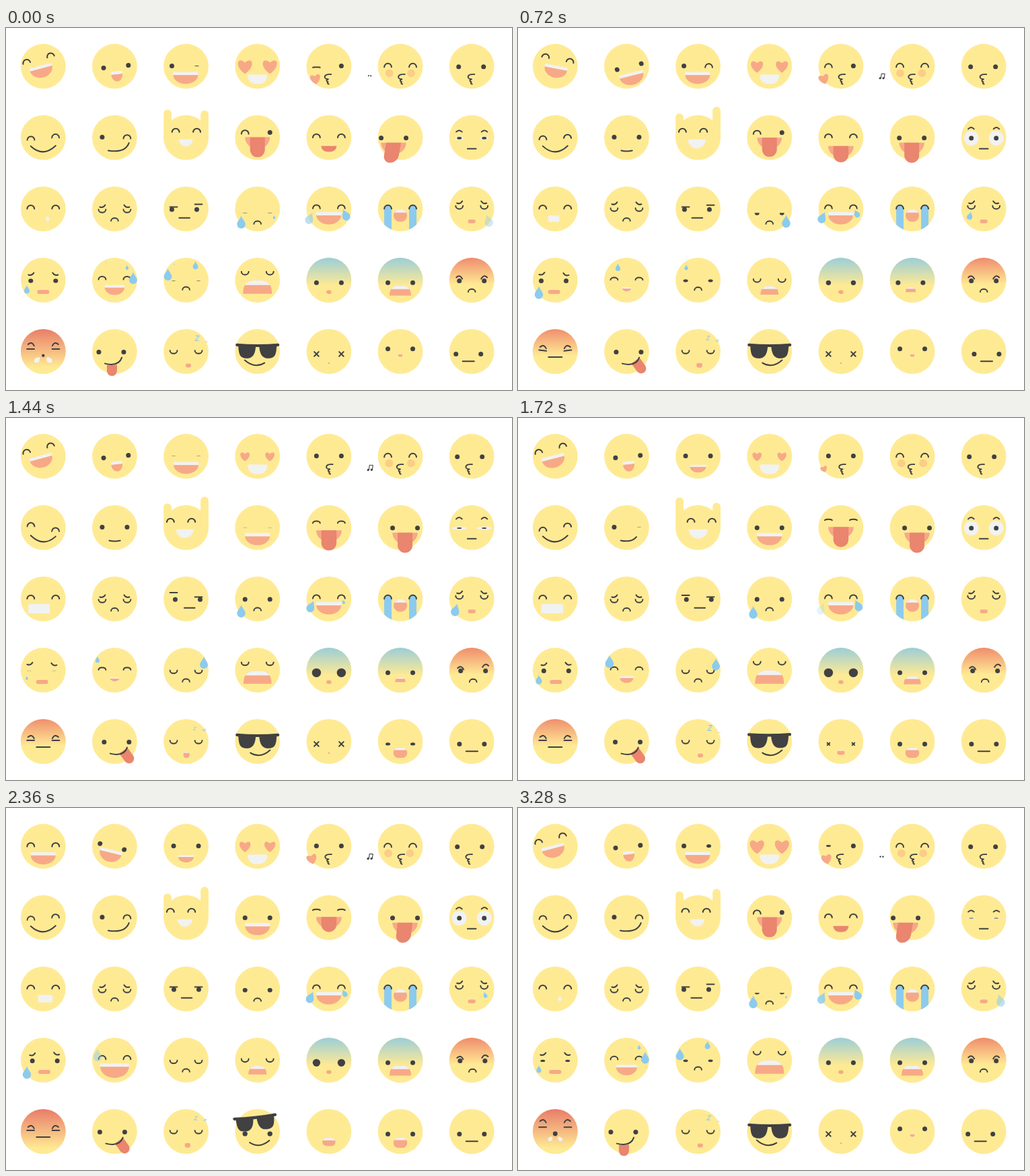
Recreate the animation shown at these times as an HTML page with a canvas. Size 752x539 px, loop 3320 ms.

```html
<!DOCTYPE html>
<html lang="en">
<head>
<meta charset="utf-8">
<title>Faces</title>
<style>
html, body { margin: 0; width: 752px; height: 539px; overflow: hidden; background: #fff; }
canvas { display: block; }
</style>
</head>
<body>
<canvas id="stage" width="752" height="539"></canvas>
<script>
const g = document.getElementById('stage').getContext('2d');
const LOOP = 3320, STEP = 106.15, R = 33.4, TAU = Math.PI * 2;
const SKIN = '#ffea94', INK = '#414042', WHITE = '#f1f2f2', PINK = '#f7a987',
      TONGUE = '#ea856f', BLUE = '#8ccbef';
let now = 0;

// Timing: all in ms of the loop
const clamp = (v, lo = 0) => Math.max(lo, Math.min(1, v));
const smooth = v => clamp(v) ** 2 * (3 - 2 * clamp(v));
const since = t => (now - t + LOOP) % LOOP;
// Eases 0 -> 1 from time a and back to 0 from time b
const on = (a, b, rise = 200, fall = rise) =>
  smooth(since(a) / rise) - smooth((since(a) - (b - a + LOOP) % LOOP) / fall);
// 1, dipping to 0 at time t
const blink = (t, half = 90) => clamp(Math.min(since(t), LOOP - since(t)) / half);
const wave = (n, peak = 0) => Math.cos(n * TAU * (now - peak) / LOOP);
const cycle = (n, shift) => (n * now / LOOP + shift) % 1;

const both = draw => { draw(-1); draw(1); };
function at(x, y, deg, draw, sx = 1, sy = sx) {
  g.save();
  g.translate(x, y);
  g.rotate(deg * Math.PI / 180);
  g.scale(sx, sy);
  draw();
  g.restore();
}
function fill(color, path) {
  g.beginPath();
  path();
  g.fillStyle = color;
  g.fill();
}
function stroke(path, width = 2) {
  g.beginPath();
  path();
  g.strokeStyle = INK;
  g.lineWidth = width;
  g.stroke();
}
const disc = (x, y, r, color = INK, ry = r) =>
  fill(color, () => g.ellipse(x, y, Math.max(0, r), Math.max(0, ry), 0, 0, TAU));
const box = (x, y, w, h, color, r = 0) =>
  fill(color, () => g.roundRect(x, y, w, h, r));
const line = (x, y, half, slope = 0) =>
  stroke(() => { g.moveTo(x - half, y - slope); g.lineTo(x + half, y + slope); });
const curve = (x, y, cx, cy, x2, y2) =>
  stroke(() => { g.moveTo(x, y); g.quadraticCurveTo(cx, cy, x2, y2); });

// Eyes and brows
const arch = (x, y, s = 1) =>
  stroke(() => g.ellipse(x, y + 2.7, 5.4, 5.4 * s, 0, Math.PI, TAU));
const cup = (x, y, s = 1) =>
  stroke(() => g.ellipse(x, y - 2.3, 5.4, 4.6 * s, 0, 0, Math.PI));
function dot(x, y, low = 1, up = low, r = 3.5) {
  fill(INK, () => {
    g.ellipse(x, y, r, r * Math.max(.12, low), 0, 0, Math.PI);
    g.ellipse(x, y, r, r * up, 0, Math.PI, TAU);
  });
}
// w runs from 1 (dot) to -1 (closed arch)
const wink = (x, y, w) => w < 0 ? arch(x, y - .5, -w) : dot(x, y, w);
const arches = (y, s) => both(d => arch(18.5 * d, y, s));
const cups = (y, s) => both(d => cup(18.5 * d, y, s));
const dots = (x, y, low, up, r) => both(d => dot(x + 18.5 * d, y, low, up, r));
const sadBrows = (x, y, lean = 0) => both(d =>
  curve(x + 22 * d, y + 1 + lean * d, x + 17 * d, y + 3 + lean * d, x + 14 * d, y - 2 + lean * d));
const angryBrow = (d, x, y) => curve(x + 4.5 * d, y, x - d, y - 5, x - 4.5 * d, y + 2);

// Mouths
const bowl = (x, y, w, h, color = PINK) =>
  fill(color, () => g.ellipse(x, y, w / 2, h, 0, 0, Math.PI));
function grin(x, y, w, bar, h) {
  bowl(x, y + bar - .3, w, h);
  box(x - w / 2, y, w, bar, WHITE, .6);
}
const tongue = (x, y, w, len, deg = 0) => at(x, y, deg, () =>
  box(-w / 2, 0, w, len, TONGUE, [0, 0, Math.min(w / 2, len), Math.min(w / 2, len)]));
const frown = (x, y) => stroke(() => g.ellipse(x, y + 2, 5.3, 4.3, 0, Math.PI, TAU));
const pill = (x, y, w, h) => box(x - w / 2, y - h / 2, w, h, PINK, h * .45);
function toothed(top, height, path) {
  g.save();
  g.beginPath();
  path();
  g.clip();
  g.fillStyle = PINK;
  g.fillRect(-R, top, 2 * R, 2 * R);
  g.fillStyle = WHITE;
  g.fillRect(-R, top, 2 * R, height);
  g.restore();
}
const gape = (x, top, w, h, teeth = .28) => toothed(top, h * teeth, () =>
  g.roundRect(x - w / 2, top, w, h, Math.min(w, h) * .48));
const wail = (x, top, half, bottom) => toothed(top, (bottom - top) * .36, () => {
  g.moveTo(x - half, bottom);
  g.bezierCurveTo(x - half, top + 3, x - half * .6, top, x, top);
  g.bezierCurveTo(x + half * .6, top, x + half, top + 3, x + half, bottom);
});
const lips = x => at(x, 19, 0, () => stroke(() => {
  g.moveTo(4.5, -7);
  g.bezierCurveTo(-1, -7.5, -5, -6, -5, -3);
  g.bezierCurveTo(-5, -.8, -2, .2, .2, .2);
  g.bezierCurveTo(-3, .8, -3, 4.1, 0, 4.1);
  g.bezierCurveTo(-1.6, 5, -1, 7, 1, 7.5);
}, 1.9));

// Extras
const heart = (x, y, w, deg = 0) => at(x, y, deg, () => fill(PINK, () => {
  g.moveTo(0, .47);
  g.bezierCurveTo(-.75, -.05, -.45, -.68, 0, -.25);
  g.bezierCurveTo(.45, -.68, .75, -.05, 0, .47);
}), w * 1.1);
// A drop that swells, slides by (dx, dy) and fades while p runs from 0 to 1
function drip(p, x, y, dx, dy, h = 19, deg = 0) {
  if (p <= 0 || p >= 1) return;
  const slide = p ** .6;
  g.globalAlpha = clamp((1 - p) * 5);
  at(x + dx * slide, y + dy * slide, deg, () => fill(BLUE, () => {
    g.moveTo(0, -.5);
    g.bezierCurveTo(.06, -.25, .33, -.05, .33, .17);
    g.arc(0, .17, .33, 0, Math.PI);
    g.bezierCurveTo(-.33, -.05, -.06, -.25, 0, -.5);
  }), h * clamp(p * 2.6));
  g.globalAlpha = 1;
}
const sweat = (start, x, y, dy, h) => drip(since(start) / 1280, x, y, 0, dy, h);
function flush(color, end) {
  const tint = g.createLinearGradient(0, -R, 0, -R + 2 * R * end);
  tint.addColorStop(.04, color);
  tint.addColorStop(1, SKIN);
  disc(0, 0, R, tint);
}
function note(p) {
  at(-21 - 24 * smooth(p * 1.4), 23 - 12 * p * p, 14 * p * p, () => {
    disc(-2.6, 3.4, 1.6);
    disc(2.4, 2.6, 1.6);
    if (p < .88) {
      stroke(() => {
        g.moveTo(-1.4, 3); g.lineTo(-1.4, -4); g.lineTo(3.6, -4.6); g.lineTo(3.6, 2.4);
      }, 1.1);
    }
  }, p < .8 ? clamp(p * 1.6) : 1 - (p - .8) * 2.2);
}
function snore(p) {
  const flat = clamp((p - .68) * 10);
  const size = 1.1 * (p < .65 ? clamp(p * 2.1 - .1) : 1 - clamp((p - .68) * 2.2));
  at(5.5 + 28 * p, -15 - 5 * Math.sin(Math.min(p, .4) * 4) + 22 * Math.max(0, p - .65), 0, () => {
    g.transform(1, 0, -.3 * clamp(1.6 - p * 2.6), 1, 0, 0);
    g.fillStyle = BLUE;
    g.font = '600 14px "Open Sans", sans-serif';
    g.fillText('Z', 0, 5);
  }, size, size * (1 - .75 * flat));
}
function glasses() {
  stroke(() => { g.moveTo(-30.5, -9.8); g.quadraticCurveTo(0, -7.4, 30.5, -9.8); }, 4.2);
  both(d => fill(INK, () => {
    g.moveTo(2.5 * d, -9);
    g.bezierCurveTo(3 * d, 4, 7 * d, 10.3, 15 * d, 10.3);
    g.bezierCurveTo(25 * d, 10.3, 28 * d, 7, 28.5 * d, -9);
  }));
}
const sparkle = (x, y, r) => fill(WHITE, () => {
  for (let i = 0; i < 8; i++) {
    const a = (i + 1) * TAU / 8, q = i % 2 ? r * .42 : r;
    g.lineTo(x + q * Math.cos(a), y + q * Math.sin(a));
  }
});
function steam(p) {
  if (p >= 1) return;
  const q = Math.sqrt(p);
  g.globalAlpha = clamp((1 - p) * 6);
  both(d => {
    const x = d * (3 + 17 * q), y = 7 + 17 * q;
    disc(x, y, 1 + 7 * q, WHITE);
    disc(x + 4 * d * q, y + 2 * q, 1 + 6 * q, WHITE);
    disc(x - 5 * d * q, y - 6 * q, 1 + 4 * q, WHITE);
  });
  g.globalAlpha = 1;
}

const faces = [
  // Row 1
  () => {
    const right = on(200, 1150) + .75 * on(2550, 2900), left = on(1150, 1700) + on(2900, 200);
    const tilt = right - left, lift = right + left;
    at(5.2 * tilt - 1.5 * lift, -9.8 * lift, 13 * tilt - 2 * lift, () => {
      arches(-2.3);
      grin(0, 9, 37 - 3 * lift, 4.5, 14);
    });
  },
  () => {
    const right = on(150, 1100, 250), left = on(1700, 2900, 250), big = right + left;
    at(2 + 1.8 * right - 5.7 * left, .5, -6 - 8 * right + 20 * left, () => {
      dots(0, 0);
      grin(0, 7 + 2.5 * right - 2.2 * left, 17 + 19 * right + 16 * left, 4.5, 11 + 3 * big);
    });
  },
  () => {
    const aside = on(3100, 700), small = on(1550, 3000), x = -2.6 * aside;
    dot(x - 18.5, -.5, blink(1440));
    wink(x + 18.5, -.5, (1 - 2 * on(3240, 800, 180)) * blink(1440));
    grin(-.6 * aside, 8.5 + 4.5 * small, 37 - 14 * small, 4.5 - 1.5 * small, 13.5 - 5 * small);
  },
  () => {
    both(d => heart(18.5 * d, .3, 17.3 + 3.7 * wave(1)));
    box(-14.5, 12.3, 29, 14.3, WHITE, [2, 2, 14, 14]);
  },
  () => {
    wink(-18.5, -.5, 1 - 2 * on(3190, 1120, 250));
    dot(18.5, -.5);
    const near = on(3150, 150);
    heart(-25.2 + 5.5 * near, 19, 15 * (1 - on(1200, 1600)), -17 + 7 * near);
    lips(.6 - 1.8 * wave(3));
  },
  () => {
    arches(-1.5);
    both(d => disc(16.2 * d - 1 + .9 * wave(2), 10.3, 5.9, '#fccd86'));
    lips(.3 + 1.8 * wave(3));
    note(cycle(4, .95));
  },
  () => {
    const aside = on(700, 2350, 300);
    dots(-1 - 2 * aside, .7);
    lips(-.5 - 3.3 * aside);
  },
  // Row 2
  () => {
    const tilt = 3.7 * clamp(1.8 * wave(2, 349), -1);
    both(d => arch(18.3 * d, -.7 - tilt * d));
    curve(-18.5, 12.5 + tilt / 5, 0, 30, 18.5, 12.5 - tilt / 5);
  },
  () => {
    const s = on(1600, 120, 250);
    dot(-18.5, -.7);
    wink(18.5, -.7, 1 - 2 * s);
    curve(-8 - 1.5 * s, 19.3, 15.5 * s, 21.5 + 2 * s, 8.3 + 13 * s, 19.3 - 11.3 * s);
  },
  () => {
    const sway = clamp(1.6 * wave(4, 199), -1), w = 24.5 - 3.5 * wave(3);
    both(d => {
      const top = -41 + 5 * sway * d;
      box(d < 0 ? -R : R - 11.8, top, 11.8, 2 - top, SKIN, [6, 6, 0, 0]);
      arch(7 * sway - .5 + 15.7 * d, -10.8);
    });
    bowl(1.2 * sway - .6, 2.6, w, w / 2, WHITE);
  },
  () => {
    const s = on(2500, 700);
    wink(-18.5, .3 - 8 * s, (1 - 2 * s) * blink(1440));
    dot(18.5, .3 - 8 * s, blink(1440));
    grin(0, 8 - 8.3 * s, 37, 5 * (1 - s), 13.5 + 4 * s);
    if (s > .05) tongue(0, 13 - 13.3 * s, 22, 29.5 * s);
  },
  () => {
    const up = on(1150, 2400, 500), wide = on(100, 2900, 400), y = 12.7 - 13.7 * up;
    arches(-2.5 - 11 * up, 1 - .7 * up);
    bowl(0, y, 23 + 15 * wide, 8.5 + 8.5 * wide);
    tongue(0, y, 22.5, 8.5 + 14 * wide + 7.5 * on(600, 1800, 400));
  },
  () => {
    const x = -10 + 17 * on(380, 2400, 650);
    dots(x, .5, blink(390));
    bowl(x, 7.5, 37.5, 17.5);
    at(x, 7.5, 0, () => {
      g.transform(1, 0, -.17 * Math.max(0, wave(3)), 1, 0, 0);
      tongue(0, 0, 22, 30);
    });
  },
  () => {
    const wide = on(0, 2500, 350), r = 6 + 5 * wide, y = -9.5 - 4.3 * wide;
    const open = Math.max(.12, blink(1420) * blink(3280));
    both(d => {
      curve(18.8 * d - 4.3, y + 1, 18.8 * d, y - 3.5, 18.8 * d + 4.3, y + 1);
      disc(18.5 * d, .8, r, WHITE, r * open);
      dot(18.5 * d, .8, Math.min(1, open * 1.2));
    });
    line(0, 16.5, 6.3);
  },
  // Row 3
  () => {
    arches(-2.7);
    const w = 19 - 14 * wave(1, -20), h = 5 + .28 * w;
    box(.7 + 7 * wave(1, 3000) - w / 2, 14.7 - h / 2, w, h, WHITE, 2.5);
  },
  () => {
    const rise = on(200, 750);
    sadBrows(0, -3.8 - 4.2 * rise);
    cups(3.2 - 2 * rise);
    frown(0, 16);
  },
  () => {
    const low = on(500, 2400, 600), look = on(700, 1550, 300);
    line(-18.5, -2.8 - 6.5 * look, 5.4);
    line(18.5, -6.8 + 4 * low, 5.4);
    dots(-2.6 + 3 * low + 2 * look, .9);
    line(-2.4 + 3.4 * low + 4.2 * look, 13.5, 7.8);
  },
  () => {
    const open = on(700, 2300, 250);
    dots(0, 6 - 5.2 * open, blink(15), open);
    frown(0, 20.5 - 5 * open);
    drip(cycle(2, .578) * 1.1, -24.2, 9, 0, 14);
    drip(cycle(1, .05) * 2.2, 24.8, 9, 0, 13);
  },
  () => {
    arches(-3.2);
    grin(-.2, 4.8, 37, 4.8, 14);
    both(d => drip(cycle(4, .64 - .24 * d), 18.5 * d, 0, 10.5 * d, 15, 18, -25 * d));
  },
  () => {
    g.save();
    g.beginPath();
    g.arc(0, 0, R, 0, TAU);
    g.clip();
    both(d => box(18.5 * d - 5.5, -6, 11, 45, BLUE, 5));
    g.restore();
    arches(-2.8);
    const shut = on(2500, 2950);
    gape(0, .2 + 5 * shut, 20 - 4 * shut, 19 - 4 * shut);
  },
  () => {
    sadBrows(0, -9.5);
    cups(-2.2);
    pill(0, 18.7, 11.5, 5.5);
    both(d => drip(cycle(1, .62 - .26 * d) * 2.55, 17 * d, 4, 8 * d, 14, 19, -16 * d));
  },
  // Row 4
  () => {
    const x = 2.4 * on(1600, 2400) - 2.3 * on(150, 1450);
    sadBrows(x * .8, -9, x * -.2);
    dots(x, 1, blink(1440) * blink(3240));
    pill(x * .7, 17.5, 18, 6);
    drip(cycle(2, .247), -24.3, 8, 0, 13);
  },
  () => {
    const laugh = on(1400, 2850, 1000);
    arches(-3.2 - .8 * laugh, .65 + .35 * laugh);
    grin(0, 10.5 - 5.7 * laugh, 13 + 30 * laugh, 2 + 3 * laugh, 4.5 + 12.5 * laugh);
    sweat(3240, -13, -29, 13, 11);
    sweat(2680, 18.5, -25, 9, 7);
    sweat(1200, -25.5, -21, 14, 19);
    sweat(2500, 27.5, -20, 22, 18);
  },
  () => {
    const calm = on(650, 2350, 250), w = (1 - 2 * calm) * blink(10);
    if (w >= 0) dots(0, .9, w); else cups(2.6, -w);
    frown(0, 12.3 + 3 * calm);
    sweat(2500, -27, -20, 15, 18);
    sweat(3200, -17.5, -26, 9, 8);
    sweat(2740, 14, -29, 11, 12);
    sweat(800, 26.5, -21, 15, 18);
  },
  () => {
    const s = clamp(.55 + .55 * wave(2));
    cups(1.2 - 11.5 * s);
    wail(0, 9 - 9 * s, 13 + 8.5 * s, 21.5 - 1.2 * s);
  },
  () => {
    flush('#9fcfd6', .62);
    dots(0, 3.9, 1, 1, 3.5 + 3.2 * on(600, 2050, 800));
    pill(0, 17.7, 7.5, 5.5);
  },
  () => {
    flush('#9fcfd6', .62);
    const small = on(100, 1550, 300), x = -2.7 * on(100, 1150, 300);
    dots(x, 3.9, blink(400) * blink(2790));
    wail(x * .9, 7.9 + 2 * small, 16 - 8.3 * small, 23 - 5.2 * small);
  },
  () => {
    flush('#f0906f', .6);
    const right = on(1100, 2250, 250), left = on(2450, 3000, 250), x = 2 * right - 2.5 * left;
    dots(x, 1);
    angryBrow(-1, x - 18.5, -4 + right - 3 * left);
    angryBrow(1, x + 18.5, -4 - 2.5 * right + left);
    frown(x, 15.5);
  },
  // Row 5
  () => {
    const heat = on(1700, 3250, 400), up = on(2450, 3220, 160);
    flush(`rgb(${240 - 7 * heat},${146 - 18 * heat},${112 - 5 * heat})`, .6 + .28 * heat);
    both(d => {
      line(18.7 * d, -1.5 - 7.2 * up, 5.4, -.7 * d * on(100, 1150));
      angryBrow(d, 18 * d, -6.5 - 13 * up);
    });
    const half = 10 * (1 - on(2350, 60)), y = 8.3 - 7.3 * up;
    if (half > .5) line(0, y, half);
    else disc(0, y, 1.2 + 3.3 * up);
    steam(since(3240) / 640);
  },
  () => {
    const x = -5 + 8 * on(100, 1350, 300, 1400), lick = on(100, 2300, 300, 900);
    dots(x, .9, blink(2000));
    tongue(x + 1 + 9 * lick, 20 - 6.5 * lick, 15, 16.5 + 5.5 * lick, -36 * lick);
    curve(x - 9.5, 18, x + 11, 23, x + 15.7, 9);
  },
  () => {
    cups(.9);
    const breath = clamp(.3 + .9 * wave(2, 1130)), h = 6 + 5 * breath;
    gape(3.4 - 4.4 * breath, 20.8 - 1.3 * breath - h / 2, 8 + 2 * breath, h, .3 * breath);
    snore(cycle(2, .4));
    snore(cycle(2, .9));
  },
  () => {
    dots(0, 3.5, 1, 1, 3.7);
    const s = on(150, 2250, 500), lift = on(1650, 2850, 550, 350);
    curve(-19 + 8.5 * s, 13 + 4 * s, -4.5 + 9 * s, 26, 10.5 + 8.2 * s, 17 - 4 * s);
    at(-3 * lift, -12 * lift, -6 * lift, glasses);
    sparkle(23, -2.5, 6.5 * (1 - blink(440, 200)));
  },
  () => {
    const x = 3.3 * on(2950, 1600, 250), gasp = on(1600, 2250, 250, 900);
    both(d => {
      if (x > .3) both(e => line(18.5 * d, 3.8, x, x * e));
      disc(18.5 * d, .9, 3.7 * on(2450, 2950));
    });
    gape(0, 16.5 - 7.3 * gasp, 3 + 17 * gasp, 2 + 10.5 * gasp, .33 * gasp);
  },
  () => {
    const awe = on(1150, 3000, 250);
    dots(0, -3.8 + 7.6 * awe, blink(1385));
    gape(0, 3 + 6 * awe, 6.5 + 14 * awe, 5 + 10.5 * awe, .25);
  },
  () => {
    const x = -5 + 5.2 * on(100, 2350) + 7.7 * on(100, 600, 250);
    dots(x, 3.9, blink(2000));
    line(x, 14.6, 8.6);
  },
];

function frame(time) {
  now = time % LOOP;
  g.fillStyle = '#fff';
  g.fillRect(0, 0, 752, 539);
  g.lineCap = 'round';
  g.lineJoin = 'round';
  g.textAlign = 'center';
  faces.forEach((draw, i) => at(55.3 + STEP * (i % 7), 57 + STEP * Math.floor(i / 7), 0, () => {
    disc(0, 0, R, SKIN);
    draw();
  }));
  requestAnimationFrame(frame);
}
requestAnimationFrame(frame);
</script>
</body>
</html>
```
